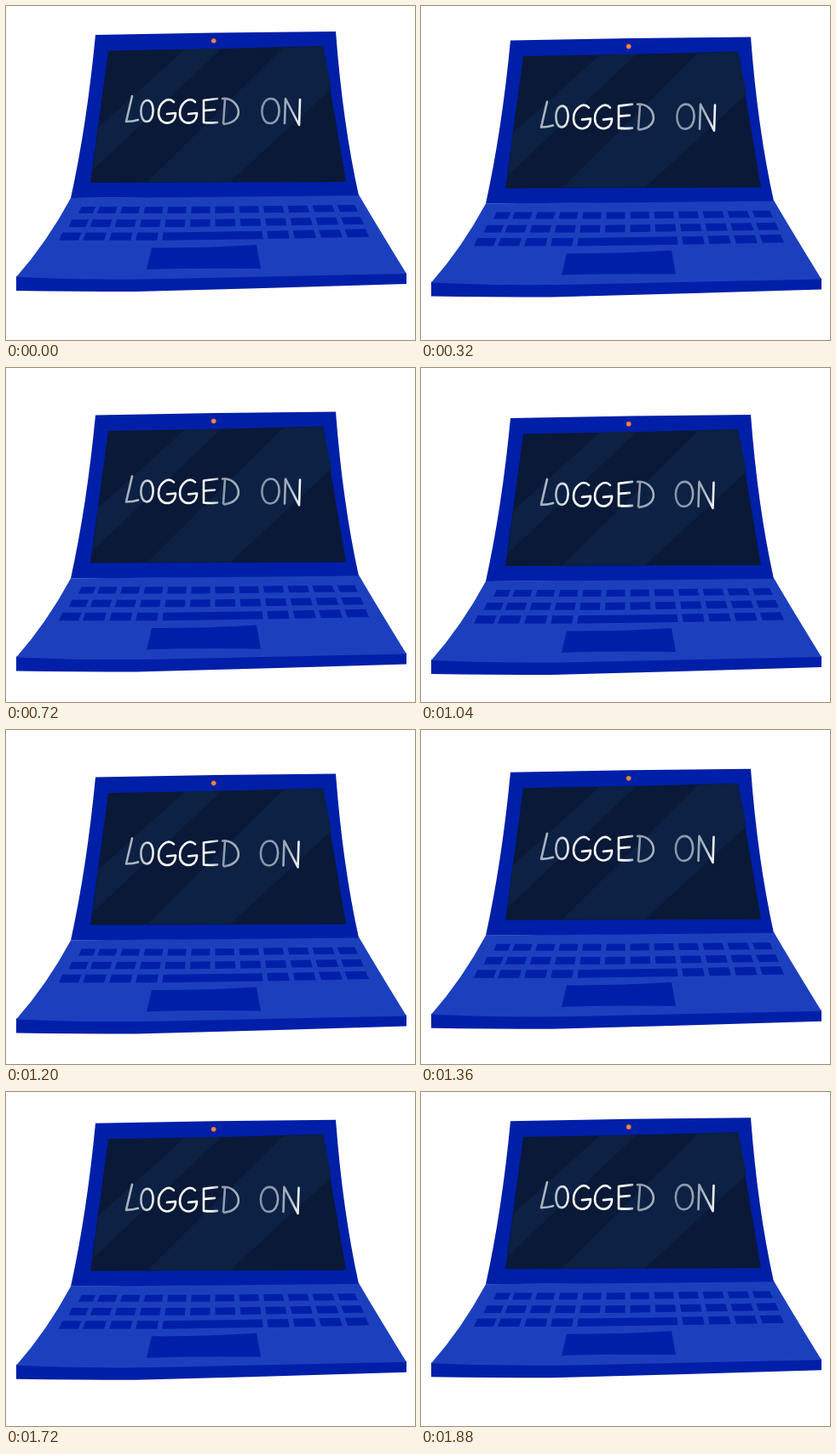
Write an HTML page that moves like this. It is 480 by 393 pixels and loops after 1.92 s.

```html
<!DOCTYPE html>
<html lang="en">
<head>
<meta charset="utf-8">
<title>Logged on</title>
<style>
html, body { margin: 0; width: 100%; height: 100%; overflow: hidden; background: #fff; }
svg { display: block; width: 100vw; height: 100vh; }
</style>
</head>
<body>
<svg viewBox="0 0 480 393" role="img" aria-label="Laptop: logged on">
  <defs>
    <linearGradient id="ink" gradientUnits="userSpaceOnUse" x1="139" y1="0" x2="347" y2="0">
      <stop offset="0" stop-color="#a4adba"/>
      <stop offset=".1" stop-color="#b8c0ca"/>
      <stop offset=".18" stop-color="#fff"/>
      <stop offset=".48" stop-color="#fff"/>
      <stop offset=".55" stop-color="#8e99aa"/>
      <stop offset=".65" stop-color="#a9b2bf"/>
      <stop offset=".78" stop-color="#8592a5"/>
      <stop offset=".93" stop-color="#a3adbb"/>
      <stop offset="1" stop-color="#fff"/>
    </linearGradient>
  </defs>
  <g id="laptop">
    <!-- front edge, base, lid, screen, reflections, camera, trackpad -->
    <path fill="#001fa8" d="M12 318L470 314V327Q310 332 153 336Q80 336 12 335Z"/>
    <path fill="#1c40bd" d="M76 226L414 222Q435 258 470 315Q320 318 190 321Q100 323 12 319Q48 278 76 226Z"/>
    <path fill="#001fa8" d="M105 34Q245 31 387 30Q395 137 414 223Q245 225 76 226Q95 139 105 34Z"/>
    <path fill="#0a1937" d="M120 52.5Q245 51 372 47L399 207L99 208Z"/>
    <path fill="#0c2143" d="M210 51L253 50L102 193L108 143ZM325 49L372 47L382 97L263 207H166Z"/>
    <circle cx="243.7" cy="41" r="2.8" fill="#f58a3c" stroke="#8a4a60" stroke-width=".6"/>
    <path fill="#001fa8" d="M171 284.5Q230 285 294 281L299 309Q220 308 165 310Z"/>
    <path id="keys" fill="#001fa8"/>
    <g fill="none" stroke="url(#ink)" stroke-width="2.6" stroke-linecap="round" stroke-linejoin="round">
      <path id="logged"/>
      <path id="on"/>
    </g>
  </g>
</svg>
<script>
const PERIOD = 1920, STEP = 40, DROP = 25.4;
const laptop = document.getElementById("laptop");
const keys = document.getElementById("keys");
const logged = document.getElementById("logged");
const on = document.getElementById("on");

// Handwritten strokes, relative to each letter's starting point.
const letterL = "l-7 30q8 0 14 -2";
const letterG = "c-8 -8 -18 3 -18 13c0 15 20 16 20 0l-10 1";
const letterE = "l-16 2v26q8 1 16 0m-15 -14l12 -1";
const letterD = "l-2 28m-1 -29c20 -2 29 27 2 30";
const letterN = "l1 -29l16 31l1 -30";
const letterO = (w, h) => `c${-w} 0 ${-w} ${h} -1 ${h}c${w} 0 ${w} ${-h} 1 ${-h}`;
const at = (x, y, strokes) => `M${x} ${y}${strokes}`;

logged.setAttribute("d",
  at(148, 106, letterL) + at(166, 111, letterO(10, 25)) +
  at(197, 113, letterG) + at(222, 113, letterG) +
  at(248, 109, letterE) + at(257, 110, letterD));
on.setAttribute("d", at(311, 109, letterO(14, 29)) + at(327, 138, letterN));

// Rows spread towards the viewer; x is the key's left edge, y its top.
function key(row, x, end) {
  const top = x => 236 + 15.2 * row - (2 + row) * Math.max(0, x - 220) / 200;
  const lean = x => (245 - x) * .023;
  const height = 8 + .7 * row;
  return `M${x + lean(x)} ${top(x)}L${end + lean(end)} ${top(end)}` +
         `L${end} ${top(end) + height}L${x} ${top(x) + height}Z`;
}

let keyShapes = "";
for (let row = 0; row < 3; row++) {
  const edge = i => 107 - 8.5 * row + (26.9 + 2.1 * row) * i + (.16 - .08 * row) * i * i;
  const right = 413 + 7 * row;
  keyShapes += key(row, 85 - 11.5 * row, edge(0) - 5);
  for (let i = 0; i < 11; i++) {
    const from = i;
    if (row === 2 && i === 3) i = 6; // space bar
    keyShapes += key(row, edge(from), Math.min(edge(i + 1) - 6, right));
  }
}
keys.setAttribute("d", keyShapes);

const smooth = u => u * u * (3 - 2 * u);
const start = performance.now();

function draw() {
  const phase = Math.floor((performance.now() - start) % PERIOD / STEP) * STEP / PERIOD;
  const y = DROP * smooth(1 - Math.abs(1 - 2 * phase));
  laptop.setAttribute("transform", `translate(0 ${y})`);
  // The second word sits slightly further left in the second half.
  on.setAttribute("transform", `translate(${phase < .5 ? 0 : -1.5} 0)`);
  requestAnimationFrame(draw);
}
draw();
</script>
</body>
</html>
```
